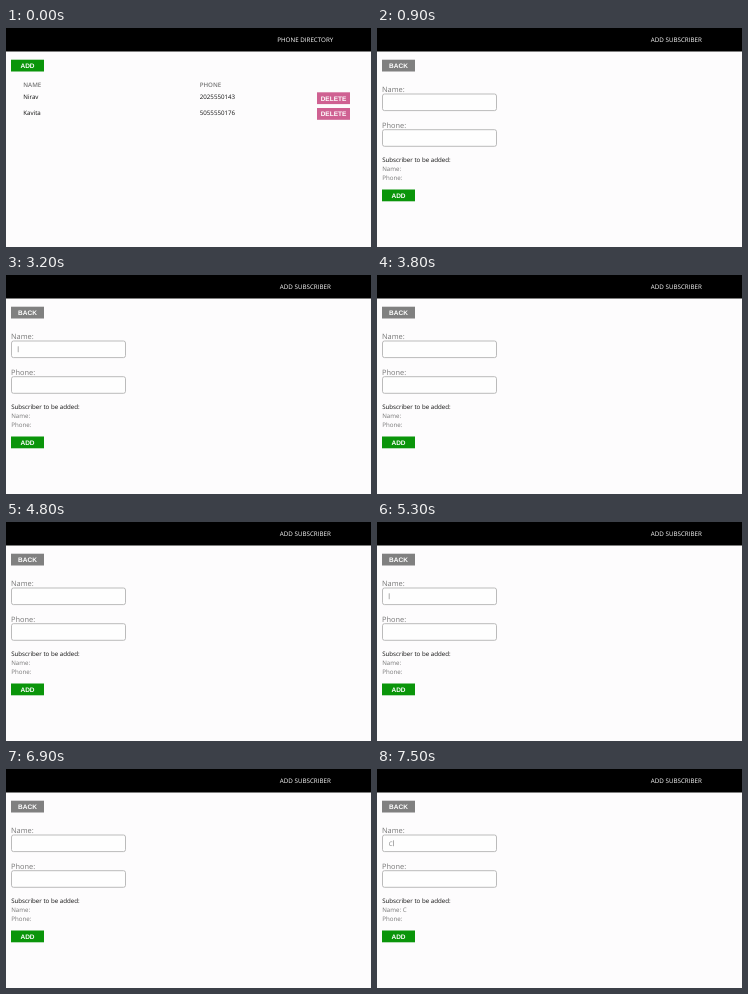
An HTML page that plays this animation: 365x219 px, repeating every 8000 ms.

```html
<!DOCTYPE html>
<html lang="en">
<head>
<meta charset="utf-8">
<title>Phone directory</title>
<style>
html, body { margin: 0; width: 100%; height: 100%; overflow: hidden; background: #fdfcfd; }
svg { display: block; width: 365px; height: 219px; }
text { font: 6.17px "Open Sans", "Noto Sans", sans-serif; fill: #111; text-rendering: geometricPrecision; white-space: pre; }
.title { fill: #fff; text-anchor: middle; font-size: 6.24px; }
.head { fill: #777; font-weight: 600; }
.label { fill: #777; font-size: 7.4px; }
.soft { fill: #777; }
.button { font: bold 6.5px "Liberation Sans", Arial, sans-serif; fill: #fff; text-anchor: middle; }
.field { fill: #fefefe; stroke: #aaa; stroke-width: .8; }
</style>
</head>
<body>
<svg viewBox="0 0 365 219">
  <rect width="365" height="219" fill="#fdfcfd"/>
  <rect width="365" height="23.5"/>
  <g id="list"></g>
  <g id="form"></g>
</svg>
<script>
const LOOP = 8000, OPEN = 900, TYPED = 7500;
const BLINKS = [2200, 2700, 3200, 3800, 4300, 4800, 5300, 5900, 6400, 6900];
const GREEN = '#0a950a', GRAY = '#808080', PINK = '#cf6192';
const list = document.getElementById('list');
const form = document.getElementById('form');

function add(parent, tag, attrs, content = '') {
  const el = document.createElementNS('http://www.w3.org/2000/svg', tag);
  for (const key in attrs) el.setAttribute(key, attrs[key]);
  el.textContent = content;
  parent.append(el);
  return el;
}
const write = (parent, x, y, content, cls = '') =>
  add(parent, 'text', { x, y, class: cls }, content);

function button(parent, x, y, content, fill) {
  add(parent, 'rect', { x, y, width: 33, height: 11.8, fill });
  write(parent, x + 16.5, y + 8.3, content, 'button');
}
const field = y =>
  add(form, 'rect', { x: 5.5, y, width: 114, height: 16.6, rx: 2, class: 'field' });

write(list, 299.3, 13.8, 'PHONE DIRECTORY', 'title');
button(list, 5, 31.7, 'ADD', GREEN);
write(list, 17.3, 58.6, 'NAME', 'head');
write(list, 193.7, 58.6, 'PHONE', 'head');
[['Nirav', '2025550143'], ['Kavita', '5055550176']].forEach(([name, phone], i) => {
  const y = 71.3 + i * 15.7;
  write(list, 17.3, y, name);
  write(list, 193.8, y, phone);
  button(list, 311, y - 7, 'DELETE', PINK);
});

write(form, 299.3, 13.8, 'ADD SUBSCRIBER', 'title');
button(form, 5, 31.7, 'BACK', GRAY);
write(form, 5, 64.1, 'Name:', 'label');
field(66);
write(form, 5, 99.8, 'Phone:', 'label');
field(101.7);
write(form, 5.2, 134.3, 'Subscriber to be added:');
const echo = write(form, 5.2, 143, 'Name:', 'soft');
write(form, 5.2, 151.6, 'Phone:', 'soft');
button(form, 5, 161.5, 'ADD', GREEN);
const entry = write(form, 11.8, 76.6, '', 'soft');
const caret = add(form, 'rect', { y: 71.3, width: .7, height: 5.9, fill: '#888' });

const show = (el, on) => el.setAttribute('visibility', on ? 'visible' : 'hidden');

function draw(now) {
  const t = now % LOOP;
  const onForm = t >= OPEN, typed = t >= TYPED;
  const blink = BLINKS.filter(time => time <= t).length % 2 === 1;
  list.style.display = onForm ? 'none' : '';
  form.style.display = onForm ? '' : 'none';
  show(caret, typed || blink);
  caret.setAttribute('x', typed ? 16 : 11.8);
  entry.textContent = typed ? 'C' : '';
  echo.textContent = typed ? 'Name: C' : 'Name:';
}

const start = performance.now();
function tick() {
  draw(performance.now() - start);
  requestAnimationFrame(tick);
}
tick();
</script>
</body>
</html>
```
